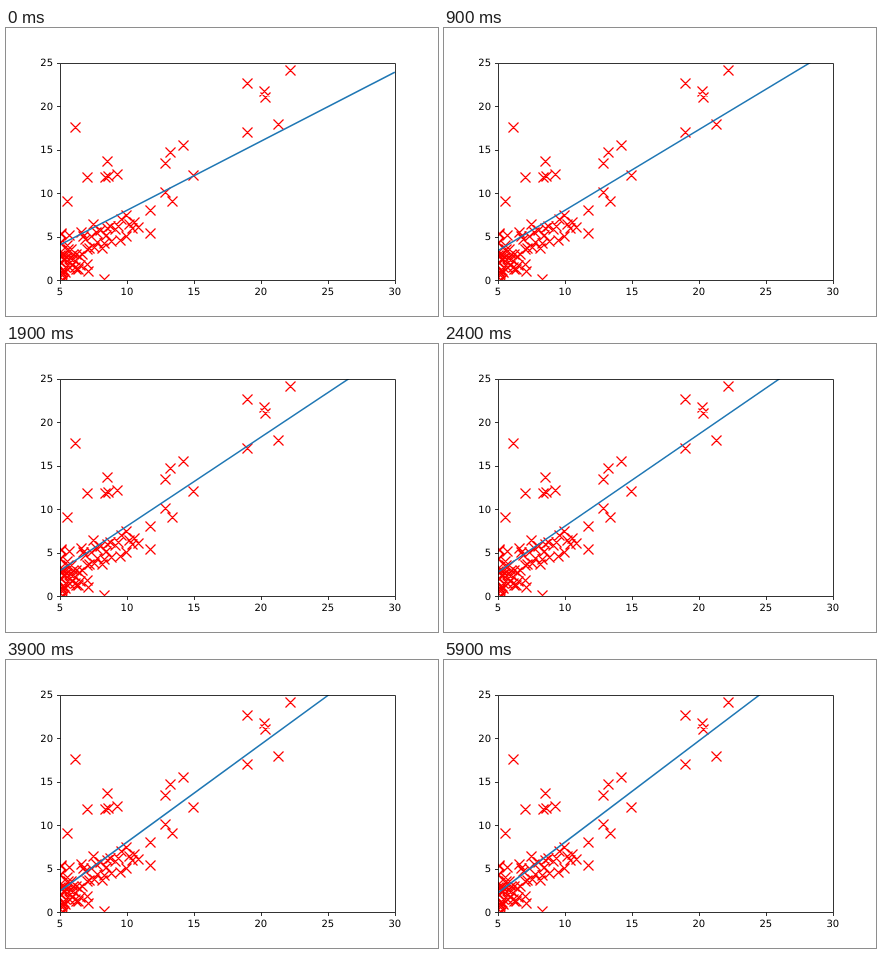
These frames come from a looping animation (432 by 288 pixels, 6 s). An HTML page:

```html
<!DOCTYPE html>
<html lang="en">
<head>
<meta charset="utf-8">
<title>Linear regression by gradient descent</title>
<style>
  html, body { margin: 0; width: 100%; height: 100%; overflow: hidden; background: #fff; }
  svg { display: block; }
  text { font: 10px "DejaVu Sans", sans-serif; fill: #000; text-rendering: geometricPrecision; }
  .axis { fill: none; stroke: #000; stroke-width: .8; }
  .marks { fill: none; stroke: #f00; stroke-width: 1.2; }
  .fit { stroke: #1f77b4; stroke-width: 1.5; }
</style>
</head>
<body>
<svg id="plot" width="432" height="288" viewBox="0 0 432 288">
  <clipPath id="area"><rect x="54" y="35" width="335" height="217"/></clipPath>
</svg>
<script>
const svg = document.getElementById('plot');
const px = x => 54 + (x - 5) * 13.392;
const py = y => 252 - y * 8.6976;
const snap = v => Math.round(v) + .5;

function add(parent, tag, attrs, text = '') {
  const el = document.createElementNS('http://www.w3.org/2000/svg', tag);
  for (const key in attrs) el.setAttribute(key, attrs[key]);
  el.textContent = text;
  return parent.appendChild(el);
}

let seed = 2027;
const random = () => (seed = seed * 16807 % 2147483647) / 2147483647;

const cross = (x, y) => `M${snap(px(x)) - 5} ${snap(py(y)) - 5}l10 10m0-10l-10 10`;

// Samples that stand apart from the cluster
const outliers = [
  [6.11, 17.59], [5.53, 9.13], [8.52, 13.66], [7, 11.85], [8.38, 11.89], [8.58, 12],
  [9.25, 12.13], [14.16, 15.5], [12.83, 13.5], [13.18, 14.69], [12.84, 10.12],
  [14.91, 12.05], [13.39, 9.06], [11.7, 8], [11.71, 5.39], [18.95, 22.64], [18.96, 17.05],
  [20.27, 21.77], [20.34, 20.99], [21.28, 17.93], [22.2, 24.15], [7.09, 1.05], [8.29, .14]
];
let marks = outliers.map(p => cross(...p)).join('');

// The cluster is dense at the left and thins out as it narrows upwards.
const count = 74;
for (let i = 0; i < count; i++) {
  const x = 5.03 + 5.9 * ((i + random()) / count) ** 2.75;
  const low = 1.1 * (x - 5) - .4, high = 5.4 + .42 * (x - 5);
  marks += cross(x, low + (high - low) * random() ** 1.25);
}

const data = add(svg, 'g', { 'clip-path': 'url(#area)' });
add(data, 'path', { class: 'marks', d: marks });
const fit = add(data, 'line', { class: 'fit', x1: px(5), x2: px(30) });

let axis = 'M54.5 35.5H389.5V252.5H54.5Z';
for (let v = 0; v <= 25; v += 5) {
  const x = px(v + 5), y = py(v);
  axis += `M${snap(x)} 252.5v3.5M54.5 ${snap(y)}h-3.5`;
  add(svg, 'text', { x, y: 267, 'text-anchor': 'middle' }, v + 5);
  add(svg, 'text', { x: 47, y: Math.round(y + 3.9), 'text-anchor': 'end' }, v);
}
add(svg, 'path', { class: 'axis', d: axis });

// The slope error decays exponentially while the line turns about one point.
const pivot = { x: 9.954, y: 7.98 };
function draw(now) {
  const step = Math.floor(now % 6000 / 100);
  const slope = 1.193 - .3994 * Math.exp(-.0451 * step);
  const at = x => py(pivot.y + slope * (x - pivot.x));
  fit.setAttribute('y1', at(5));
  fit.setAttribute('y2', at(30));
}

let start;
function tick(now) {
  start ??= now;
  draw(now - start);
  requestAnimationFrame(tick);
}
draw(0);
requestAnimationFrame(tick);
</script>
</body>
</html>
```
